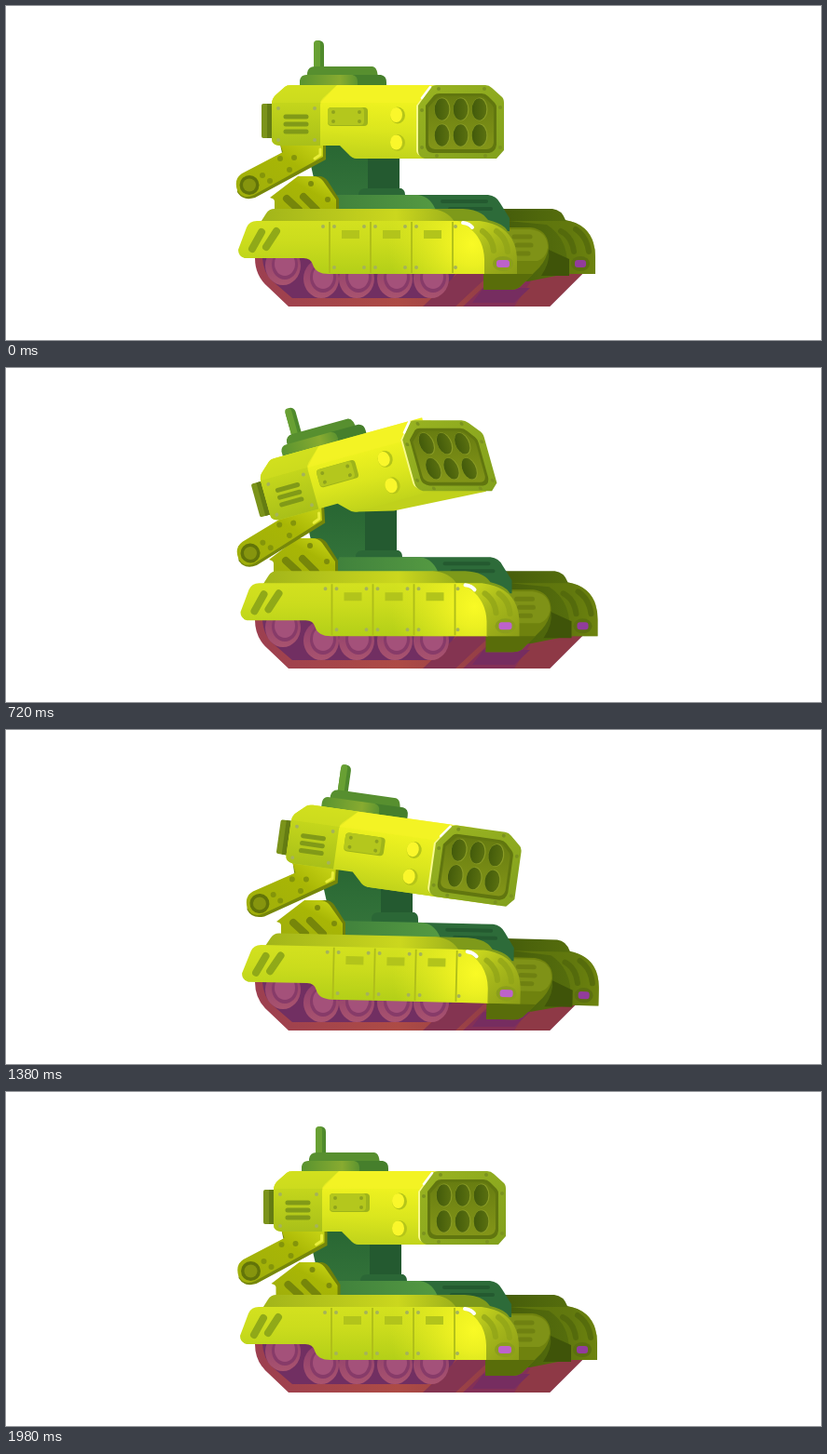
Recreate the animation shown at these times as an HTML page. Size 874 by 359 pixels, loop 2.01 s.

```html
<!DOCTYPE html>
<html lang="en">
<head>
<meta charset="utf-8">
<title>Rocket tank</title>
<style>
html, body { margin: 0; width: 100%; height: 100%; overflow: hidden; background: #fff; }
svg { display: block; width: 100%; height: 100%; }
.rivets { fill: none; stroke: #a5b35a; stroke-width: 4; stroke-linecap: round; }
.slits { fill: none; stroke-linecap: round; }
</style>
</head>
<body>
<svg viewBox="0 0 874 359">
  <defs>
    <linearGradient id="redFill"><stop offset="0" stop-color="#9c3f50"/><stop offset=".55" stop-color="#ad4b45"/><stop offset="1" stop-color="#8c3a46"/></linearGradient>
    <linearGradient id="wheelFill" x1="0" y1="0" x2="0" y2="1"><stop offset="0" stop-color="#8f3f6c"/><stop offset="1" stop-color="#a9536f"/></linearGradient>
    <linearGradient id="sideFill" x1="0" y1="0" x2="0" y2="1"><stop offset="0" stop-color="#d3e11f"/><stop offset=".4" stop-color="#cbdc1d"/><stop offset="1" stop-color="#b3cf18"/></linearGradient>
    <radialGradient id="glowFill" gradientUnits="userSpaceOnUse" cx="500" cy="256" r="90"><stop offset="0" stop-color="#f9fa25"/><stop offset=".25" stop-color="#f4f523" stop-opacity=".85"/><stop offset="1" stop-color="#e2ea1f" stop-opacity="0"/></radialGradient>
    <linearGradient id="ledgeFill"><stop offset="0" stop-color="#a1b41a"/><stop offset=".7" stop-color="#cbd71e"/><stop offset="1" stop-color="#9cb01b"/></linearGradient>
    <linearGradient id="fenderFill" x1="0" y1="0" x2="1" y2="1"><stop offset="0" stop-color="#d8e31f"/><stop offset=".5" stop-color="#a7b81b"/><stop offset="1" stop-color="#8b9d17"/></linearGradient>
    <linearGradient id="farFill"><stop offset="0" stop-color="#435a0a"/><stop offset=".75" stop-color="#566e0d"/><stop offset="1" stop-color="#70860f"/></linearGradient>
    <linearGradient id="deckFill"><stop offset="0" stop-color="#3f803c"/><stop offset="1" stop-color="#559a42"/></linearGradient>
    <linearGradient id="blockFill" x1="0" y1="0" x2="0" y2="1"><stop offset="0" stop-color="#276532"/><stop offset="1" stop-color="#35753b"/></linearGradient>
    <linearGradient id="armFill" x1="0" y1="1" x2="1" y2="0"><stop offset="0" stop-color="#9fae0c"/><stop offset=".6" stop-color="#a8b605"/><stop offset="1" stop-color="#cfdb18"/></linearGradient>
    <linearGradient id="bodyFill" x1=".5" y1="0" x2=".4" y2="1"><stop offset=".2" stop-color="#eff220"/><stop offset=".6" stop-color="#dbe61e"/><stop offset="1" stop-color="#bfd21b"/></linearGradient>
    <linearGradient id="rearFill" x1="0" y1="0" x2="0" y2="1"><stop offset="0" stop-color="#cfdf1d"/><stop offset="1" stop-color="#a9c019"/></linearGradient>
    <linearGradient id="lidFill"><stop offset="0" stop-color="#599330"/><stop offset=".7" stop-color="#88ab30"/><stop offset="1" stop-color="#5d9430"/></linearGradient>
    <linearGradient id="faceFill" x1="0" y1="0" x2="1" y2="1"><stop offset="0" stop-color="#9ab421"/><stop offset="1" stop-color="#82a01d"/></linearGradient>
    <linearGradient id="wellFill" x1="0" y1="0" x2="0" y2="1"><stop offset="0" stop-color="#687d11"/><stop offset="1" stop-color="#839518"/></linearGradient>
    <linearGradient id="tubeFill"><stop offset="0" stop-color="#425a0b"/><stop offset="1" stop-color="#5a7010"/></linearGradient>
  </defs>

  <g id="tracks">
    <path fill="#843057" d="M480 270H618V288L583 323H480Z"/>
    <path fill="#8e3946" d="M572 282H618V288L583 323H545Z"/>
    <path fill="#762d60" d="M512 303H562L545 319H500Z"/>
    <path fill="url(#redFill)" d="M267 271H545L490 323H303L281 302Q267 290 267 271Z"/>
    <path fill="#712f62" d="M275 271H492L466 314H307L285 295Q276 286 275 271Z"/>
    <path fill="#843451" d="M492 280H528L482 323H447Z"/>
    <g id="wheels"></g>
  </g>

  <g id="hull">
    <path fill="url(#farFill)" d="M530 218H586Q596 219 600 230Q632 236 632 270V288H600L560 296H520V240Z"/>
    <path fill="#6c820f" d="M538 231H604Q632 238 632 270V288H601Q606 252 580 235Z" opacity=".55"/>
    <path fill="#3f5409" d="M582 262Q584 275 574 290H604V272Z"/>
    <path class="slits" stroke="#4c620b" stroke-width="6" opacity=".6" d="M595 242Q607 248 609 264M611 240Q623 248 625 264"/>
    <path fill="#6f820e" d="M520 238H563Q582 241 582 260Q580 272 572 281L551 302Q547 305 541 305H512Z"/>
    <path fill="#7f9217" d="M530 240H562Q581 242 581 260Q579 271 570 274H530Z"/>
    <path fill="#596d0a" d="M512 288H565L551 302Q547 305 541 305H512Z"/>
    <path class="slits" stroke="#687b10" stroke-width="5" opacity=".7" d="M545 248H562M548 257H563M549 266H560"/>
    <ellipse cx="616" cy="277" rx="10" ry="8" fill="#5c7010"/>
    <rect x="610" y="273" width="12" height="8" rx="3" fill="#923c9c"/>
  </g>

  <g id="block">
    <path fill="url(#blockFill)" d="M320 140H390V218H310L330 185Z"/>
    <path fill="#245a30" d="M388 140H422V200H388Z"/>
    <path fill="#2b6736" d="M378 203Q378 196 386 196H424Q428 198 428 203V210H378Z"/>
  </g>

  <g id="deck">
    <path fill="#2d6b39" d="M350 222L358 203H517Q526 204 530 212L540 228V242H350Z"/>
    <path fill="url(#deckFill)" d="M346 222L355 203H442Q456 205 462 222Z"/>
    <path class="slits" stroke="#245a30" stroke-width="4" d="M468 210H515M476 218H520"/>
  </g>

  <g id="plate">
    <path fill="#6f8009" d="M290 222V207L321 183H336Q341 183 345 188L357 207V222Z"/>
    <path fill="url(#armFill)" d="M288 222V210Q288 207 283 206L313 183H329Q336 183 340 188L354 208V222Z"/>
    <path class="slits" stroke="#76860a" stroke-width="8" d="M301 207L314 219M319 205L333 219"/>
    <path class="rivets" style="stroke:#7d8c0b;stroke-width:6" d="M327 191h0M345 208h0"/>
  </g>

  <g id="arm">
    <path fill="#76870a" d="M249 184L296 158L292 140H343V165L267 206Q254 210 248 200Z"/>
    <path fill="url(#armFill)" d="M253 180L297 157L291 140H340V162L266 203Q254 209 248 198Q244 186 253 180Z"/>
    <circle cx="261" cy="192.500" r="10.500" fill="#627409"/>
    <circle cx="261" cy="192.500" r="7" fill="#86950e"/>
    <path class="rivets" style="stroke:#84950a;stroke-width:6" d="M275 182h0M294 164h0M309 163h0M304 176h0M283 188h0"/>
    <path class="slits" stroke="#e9ee3b" stroke-width="3" d="M337 154V160L331 164"/>
  </g>

  <g id="near">
    <path fill="#7e9a1a" d="M455 218H490Q510 219 517 230Q540 235 540 250H470Z"/>
    <path fill="url(#ledgeFill)" d="M272 234L279 223Q282 218 288 218H455Q473 219 481 232Z"/>
    <g id="panel"></g>
    <path fill="url(#fenderFill)" d="M484 231H508Q548 236 548 274V288H513V272Q512 243 484 231Z"/>
    <path class="slits" stroke="#8fa317" stroke-width="6" opacity=".7" d="M511 242Q522 250 523 263M526 242Q537 250 538 264"/>
    <path class="slits" stroke="#fff" stroke-width="4" d="M490 233Q497 234 500 238"/>
    <path class="slits" stroke="#90a918" stroke-width="8" d="M264 261L274 243M279 259L290 242"/>
    <path fill="none" stroke="#aebd1a" stroke-width="1.800" d="M347 232V287M391 232V287M435 232V287M479 232V287"/>
    <path fill="#b2c41b" d="M360 241h19v9h-19zM404 241h19v9h-19zM448 241h19v9h-19z"/>
    <path class="rivets" d="M340 237h0M352 237h0M384 237h0M396 237h0M428 237h0M440 237h0M482 237h0M352 281h0M384 281h0M396 281h0M428 281h0M440 281h0M482 281h0"/>
    <ellipse cx="533" cy="277" rx="11" ry="8" fill="#8b9e1c"/>
    <rect x="526" y="273" width="14" height="8" rx="3" fill="#bd62cb"/>
  </g>

  <g id="head">
    <rect x="330" y="37" width="11" height="36" rx="5.500" fill="#4f8a2c"/>
    <rect x="330" y="37" width="7" height="36" rx="3.500" fill="#68a033"/>
    <path fill="#578f2f" d="M323 80V72Q324 65 331 65H393Q399 66 399 80Z"/>
    <path fill="#467f2c" d="M372 86V74H402Q408 75 408 82V86Z"/>
    <path fill="url(#lidFill)" d="M315 86V80Q316 74 322 74H371Q377 75 377 81V86Z"/>
    <rect x="274" y="105" width="14" height="37" rx="2" fill="#7b931b"/>
    <rect x="280" y="105" width="8" height="37" fill="#647c13"/>
    <path id="under" fill="#c0d11b"/>
    <path fill="url(#bodyFill)" d="M285 106Q285 99 290 95L299 87Q301 85 306 85H470V164H376Q371 164 367 159L358 150H293Q285 149 285 143Z"/>
    <path fill="url(#rearFill)" d="M285 106Q285 99 290 95L299 87Q301 85 306 85H355L340 99Q337 102 337 106V150H293Q285 149 285 143Z"/>
    <path fill="#f4f326" opacity=".75" d="M355 85H457L443 104H337Q337 102 340 99Z"/>
    <path fill="#d6e120" opacity=".5" d="M285 104Q286 98 290 95L299 87Q301 85 306 85H355L337 104Z"/>
    <path class="slits" stroke="#819a18" stroke-width="5" d="M300 119H322M300 127H322M300 135H322"/>
    <path class="rivets" d="M292 110h0M331 110h0M292 144h0M331 144h0"/>
    <rect x="345" y="109" width="43" height="20" rx="4" fill="#9eb41b"/>
    <rect x="345" y="109" width="39" height="19" rx="4" fill="#b4c71d"/>
    <path class="rivets" style="stroke:#8fa31d" d="M351 114h0M351 124h0M379 114h0M379 124h0"/>
    <g fill="#b5c51a"><ellipse cx="420" cy="117.500" rx="8" ry="9"/><ellipse cx="420" cy="147" rx="8" ry="9"/></g>
    <g fill="#faf72b"><ellipse cx="418.500" cy="117" rx="6.500" ry="8"/><ellipse cx="418.500" cy="146.500" rx="6.500" ry="8"/></g>
  </g>

  <g id="front">
    <path fill="#f8fa8d" d="M440 107L455 87Q457 85 462 85H480L446 112V162Q440 160 440 155Z"/>
    <path fill="url(#faceFill)" d="M442 107L455 88Q457 85 462 85H514Q518 85 521 88L531 97Q534 99 534 104V155L526 164H449Q442 162 442 156Z"/>
    <path fill="#61760f" d="M450 107L459 96Q461 94 465 94H510Q514 94 517 97L524 104Q526 106 526 110V149Q525 157 518 158H458Q450 157 450 150Z"/>
    <path fill="url(#wellFill)" d="M453 109L462 99Q464 97 467 97H508Q512 97 514 99L521 106Q523 108 523 112V147Q522 154 515 154H460Q453 153 453 147Z"/>
    <path class="slits" stroke="#fff" stroke-width="2.500" d="M446 99L455 87"/>
    <path class="rivets" style="stroke:#7b931f" d="M464 89h0M513 89h0M446 112h0M530 109h0M446 152h0M530 152h0M462 161h0M514 161h0"/>
    <g id="tubes"></g>
  </g>
</svg>
<script>
const $ = id => document.getElementById(id);
const LOOP = 2010, STEP = 30;

// time, head angle, head x/y, arm x/y/angle, block dx, plate dx, hull dx/dy/angle
const poses = [
  [0, 0, 367, 119, 0, 0, 0, 0, 0, 0, 0, 0],
  [240, -15.3, 350, 115, -3, 7, -4, -8, -4, -1, 1, -.15],
  [375, -15.5, 351, 114.5, -2, 7, -4, -6, -3, 1.5, .6, -.1],
  [510, -15.6, 349, 114.3, -3, 7, -4, -9, -4, -1, 1, -.15],
  [720, -15.5, 356, 113.5, 1, 6.5, -3.5, -3, -1, 2.5, .3, 0],
  [930, -15.3, 357, 113, 2, 6, -3.5, -1, 0, 2, 0, 0],
  [1380, 8, 385, 123, 11, -6, 4, 14, 7, 4, -.5, 1.35],
  [1710, 4, 373.5, 120, 4, -3, 1.5, 4.5, 2, 1, 0, .05],
  [1980, 0, 369, 119, 1.5, 0, 0, 2, 1.5, 2, 0, 0]
];

$('wheels').innerHTML = [[297, 279], [338, 293], [376, 293], [417, 293], [456, 293]].map(([x, y]) =>
  `<ellipse cx="${x}" cy="${y}" rx="19" ry="21" fill="url(#wheelFill)"/>
   <ellipse cx="${x + 2}" cy="${y - 1}" rx="14" ry="16" fill="#873b69"/>
   <ellipse cx="${x + 2}" cy="${y - 2}" rx="11" ry="13" fill="#a4517a"/>`).join('');

$('tubes').innerHTML = [111, 139].map(y => [468, 488, 508].map(x =>
  `<ellipse cx="${x}" cy="${y}" rx="8.500" ry="12.500" fill="#8a9c26"/>
   <ellipse cx="${x - .5}" cy="${y}" rx="7.800" ry="11.800" fill="url(#tubeFill)"/>`).join('')).join('');

$('panel').innerHTML = ['side', 'glow'].map(fill =>
  `<path fill="url(#${fill}Fill)" d="M249 262L258 238Q261 231 269 231H487Q512 238 514 270V288H346Q332 288 329 278Q327 271 319 271H256Q249 269 249 262Z"/>`).join('');

function poseAt(t) {
  const i = Math.max(1, poses.findIndex(p => p[0] >= t));
  const a = poses[i - 1], b = poses[i];
  const u = (t - a[0]) / (b[0] - a[0]), e = u * u * (3 - 2 * u);
  return a.map((v, k) => v + (b[k] - v) * e);
}

const put = (id, transform) => $(id).setAttribute('transform', transform);

function draw(t) {
  const [, tilt, hx, hy, ax, ay, armTilt, block, plate, dx, dy, roll] = poseAt(t);
  const hull = `translate(${dx} ${dy}) rotate(${roll} 250 265)`;
  for (const id of ['hull', 'deck', 'near']) put(id, hull);
  put('block', `translate(${block})`);
  put('plate', `translate(${plate})`);
  put('arm', `translate(${ax} ${ay}) rotate(${armTilt} 261 192)`);
  put('head', `translate(${hx} ${hy}) rotate(${tilt}) translate(-367 -119)`);

  // the underside shows as the launcher rises, and its front skews
  const up = Math.max(0, -tilt), k = up / 15.5, rad = Math.PI / 180;
  $('under').setAttribute('d', `M372 162L376 164L414 ${164 + 9.5 * k}L${518 - 3 * k} ${164 + 16 * k}V150H372Z`);
  const c = Math.cos(tilt * rad), s = Math.sin(tilt * rad);
  const row = Math.max(0, tilt) * rad, wide = 1 - .04 * k;
  const fx = hx + 121 * c - 6 * s, fy = hy + 121 * s + 6 * c + up * .5;
  put('front', `matrix(${wide * Math.cos(row)} ${wide * Math.sin(row)} ${-s} ${c} ${fx} ${fy}) translate(-488 -125)`);
}

const start = performance.now();
function tick() {
  const t = (performance.now() - start) % LOOP;
  draw(Math.floor(t / STEP) * STEP);
  requestAnimationFrame(tick);
}
tick();
</script>
</body>
</html>
```
